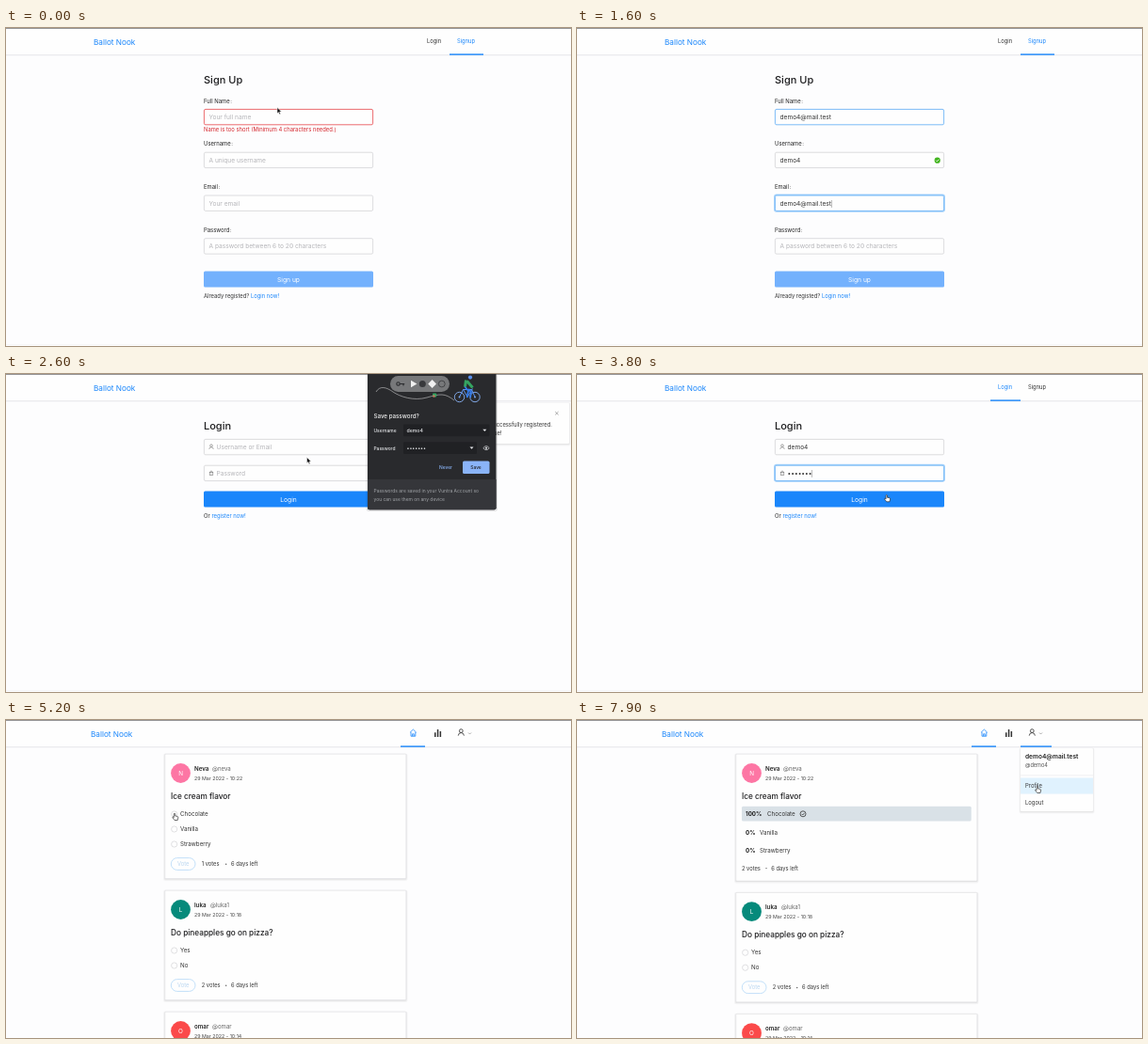
Write an HTML page that moves like this. It is 600x338 px and loops after 8 s.

```html
<!DOCTYPE html>
<html lang="en">
<head>
<meta charset="utf-8">
<title>Poll sign-up demo</title>
<style>
html, body { margin: 0; width: 100%; height: 100%; overflow: hidden; background: #fdfdfe; }
svg { display: block; width: 600px; height: 338px; font-family: Inter, "Liberation Sans", sans-serif; white-space: pre; }
</style>
</head>
<body>
<svg id="stage" viewBox="0 0 600 338"></svg>
<script>
const LOOP = 8000, BLUE = '#1a86fb', INK = '#333', GREY = '#b4b4b8';
const EMAIL = 'demo4@mail.test', USER = 'demo4', DOTS = '•••••••';
const stage = document.getElementById('stage');

const clamp = v => Math.max(0, Math.min(1, v));
const progress = (t, from, to) => clamp((t - from) / (to - from));
const ease = p => p * p * (3 - 2 * p);
const typed = (s, t, from, to) => s.slice(0, Math.floor(progress(t, from, to) * s.length + 1e-6));
const within = (t, from, to) => t >= from && t < to;

const text = (x, y, s, size = 5.9, fill = INK, extra = '') =>
  `<text x="${x}" y="${y}" font-size="${size}" fill="${fill}" ${extra}>${s}</text>`;
const rect = (x, y, w, h, fill, extra = '') =>
  `<rect x="${x}" y="${y}" width="${w}" height="${h}" fill="${fill}" ${extra}/>`;
const circle = (x, y, r, fill, extra = '') =>
  `<circle cx="${x}" cy="${y}" r="${r}" fill="${fill}" ${extra}/>`;
const line = (d, stroke, width = .7, extra = '') =>
  `<path d="${d}" fill="none" stroke="${stroke}" stroke-width="${width}" ${extra}/>`;
const shape = (d, fill, extra = '') => `<path d="${d}" fill="${fill}" ${extra}/>`;
const group = (s, x, y, opacity = 1) => `<g transform="translate(${x} ${y})" opacity="${opacity}">${s}</g>`;
const MID = 'text-anchor="middle"', MEDIUM = 'font-weight="500"', BOLD = 'font-weight="600"';

// Elevated white panel with a soft edge
const panel = (x, y, w, h) =>
  rect(x - 1.5, y - .5, w + 3, h + 3, '#000', 'opacity=".035" rx="2"') +
  rect(x - .5, y, w + 1, h + 1.2, '#000', 'opacity=".06" rx="1"') +
  rect(x, y, w, h, '#fefefe', 'rx="1"');

function header(brandX, tabs) {
  return rect(0, 0, 600, 28, '#fefefe') + rect(0, 0, 600, .9, '#8b8b8d') +
    rect(0, 28, 600, .8, '#e6e6e8') + rect(0, 28.8, 600, 1, '#f5f5f7') +
    text(brandX, 17.5, 'Ballot Nook', 8.2, BLUE) + tabs;
}

function authHeader(active) {
  const x = active ? 471 : 439;
  return header(93, text(447, 16.3, 'Login', 5.8, active ? INK : BLUE) +
    text(479, 16.3, 'Signup', 5.8, active ? BLUE : INK) + rect(x, 27.4, active ? 36 : 32, 1.4, BLUE)) +
    rect(0, 336.5, 600, .7, '#f1f1f3');
}

function field(y, o) {
  const x = o.icon ? 223.5 : 215.5;
  const edge = o.error ? '#e8474c' : o.focus || o.hover ? '#5cabf5' : '#d3d3d6';
  const caret = o.focus ? '<tspan font-weight="200" dx="-.6" fill="#000">|</tspan>' : '';
  return (o.focus ? rect(209.8, y - .3, 180.4, 17.6, 'none', 'rx="2" stroke="#a9d4fb" stroke-width="1.5"') : '') +
    rect(210.4, y + .4, 179.2, 16.4, '#fefefe', `rx="1.5" stroke="${edge}" stroke-width=".8"`) +
    (o.icon === 'user' ? userIcon(218, y + 8.4, .62, '#777') : o.icon ? lockIcon(218, y + 8.4) : '') +
    text(x, y + 11, o.value ? o.value + caret : o.hint, 6.6, o.value ? INK : GREY);
}

const button = (y, label, fill) => rect(210, y, 180, 17, fill, 'rx="1.5"') +
  text(300, y + 11.2, label, 6.7, '#fff', MID);

const userIcon = (x, y, s, color) => `<g transform="translate(${x} ${y}) scale(${s})">` +
  line('M-3.6 4 Q-3.4.6 0 .4 Q3.4.6 3.6 4', color, 1) +
  circle(0, -1.9, 2.2, 'none', `stroke="${color}" stroke-width="1"`) + '</g>';
const lockIcon = (x, y) => rect(x - 1.8, y - .6, 3.6, 2.9, 'none', 'stroke="#777" stroke-width=".6"') +
  line(`M${x - 1.2} ${y - .6}v-.8q1.2-1.8 2.4 0v.8M${x} ${y + .3}v1`, '#777', .6);

function signup(t) {
  const name = typed(EMAIL, t, 250, 650), user = typed(USER, t, 750, 1050);
  const email = typed(EMAIL, t, 1150, 1580), pass = typed(DOTS, t, 1700, 2050);
  const error = name.length < 4;
  const label = (y, s) => text(210, y, s + '\u200a:', 5.9, '#222');
  return authHeader(true) + text(210, 58.5, 'Sign Up', 11, '#1d1d1f', MEDIUM) +
    label(79.5, 'Full Name') + label(125.3, 'Username') + label(171, 'Email') + label(216.8, 'Password') +
    field(86, { value: name, hint: 'Your full name', error, hover: true, focus: within(t, 200, 700) && !error }) +
    field(131.8, { value: user, hint: 'A unique username', focus: within(t, 700, 1100) }) +
    field(177.6, { value: email, hint: 'Your email', focus: within(t, 1100, 1660) }) +
    field(223.3, { value: pass, hint: 'A password between 6 to 20 characters', focus: t >= 1660 }) +
    (error ? text(210, 110, 'Name is too short (Minimum 4 characters needed.)', 5.85, '#d5262c') : '') +
    (t > 1300 ? circle(382.7, 140.7, 3.1, '#43b51f') + line('M381.2 140.7l1.1 1.2 1.9-2.2', '#fff', .8) : '') +
    button(258.5, 'Sign up', t > 2050 ? BLUE : '#73b1fd') +
    text(210, 286.7, `Already registed? <tspan fill="${BLUE}">Login now!</tspan>`, 5.85);
}

function login(t) {
  const user = typed(USER, t, 3180, 3380), pass = typed(DOTS, t, 3420, 3680);
  return authHeader(false) + text(210, 58.5, 'Login', 11, '#1d1d1f', MEDIUM) +
    field(69, { icon: 'user', value: user, hint: 'Username or Email', focus: within(t, 3150, 3400) }) +
    field(96.8, { icon: 'lock', value: pass, hint: 'Password', focus: t >= 3400 }) +
    button(124.4, 'Login', BLUE) +
    text(210, 152.7, `Or <tspan fill="${BLUE}">register now!</tspan>`) +
    notice(t) + (within(t, 2350, 2900) ? passwordBubble() : '');
}

function notice(t) {
  const shown = ease(progress(t, 2230, 2420)) * (1 - ease(progress(t, 3400, 3560)));
  if (!shown) return '';
  return group(panel(433, 30.5, 165, 43.5) +
    circle(448, 43, 4, 'none', 'stroke="#52c41a" stroke-width=".8"') + line('M446.2 43l1.3 1.4 2.4-2.8', '#52c41a', .8) +
    text(457, 44.5, 'Ballot Nook', 6.7, '#222') +
    line('M583.2 40l3.4 3.4m0-3.4l-3.4 3.4', '#888', .7) +
    text(580, 56, "Thank you! You're successfully registered.", 5.85, INK, 'text-anchor="end"') +
    text(457, 64.6, 'Please Login to continue!', 5.85), (1 - shown) * 167, 0, shown);
}

function passwordBubble() {
  const pale = '#e8eaed', sky = '#8ab4f8', white = '#f1f1f1';
  const arrow = (x, y) => shape(`M${x - 2} ${y - 1}h4l-2 2.2z`, pale);
  const wheel = x => circle(x, 24.5, 5.2, 'none', `stroke="${sky}" stroke-width=".9"`) + circle(x, 24.5, .9, sky);
  const art = line('M393 19C397 12 404 14 411 19S433 29 447 25S466 20 476 28', '#c9cacc', .6) +
    rect(408, 2, 63, 17, '#77787a', 'rx="8.5"') +
    circle(416.5, 10.5, 1.7, 'none', 'stroke="#292a2d" stroke-width="1.1"') + line('M418.2 10.5h5m-1.2 0v2', '#292a2d', 1.1) +
    shape('M430 6.8l6.4 3.7-6.4 3.7z', white) + circle(442.3, 10.5, 3.5, '#38393c') +
    shape('M452.6 6l4.4 4.5-4.4 4.5-4.4-4.5z', white) +
    circle(462.8, 10.5, 3.4, 'none', 'stroke="#38393c" stroke-width=".8"') +
    rect(453, 20.5, 4.2, 4, '#35a461', 'rx="1"') + rect(453.4, 22.5, 2, 2, '#ea6a5d') +
    wheel(481.5) + wheel(498) +
    line('M481.5 24.5l4-8h9l3.5 8m-12.5-8l4.5 8 5.5-9', '#5a91ef', 1) +
    line('M487 13l4 5-1.5 7m1.5-9l3 3-1 6', '#347bea', 1.8) +
    line('M488.5 6.5l-1 7m2-6l6 7', '#35a461', 3) + circle(493, 3.6, 2.1, '#5a91ef');
  const label = (y, s) => text(390.5, y, s, 4.9, pale, MEDIUM);
  return rect(382.5, 0, 139.5, 146, '#000', 'opacity=".1" rx="3"') +
    rect(384, -4, 136.5, 148.3, '#292a2d', 'rx="2"') + art +
    text(390.5, 47, 'Save password?', 6.2, white, MEDIUM) +
    label(61.5, 'Username') + label(80.5, 'Password') +
    rect(422, 53.5, 91.5, 12.8, '#202124', 'rx="1"') + text(425.5, 61.7, USER, 5.2, pale, MEDIUM) + arrow(508.3, 59.7) +
    rect(422, 72.2, 78, 12.8, '#202124', 'rx="1"') + text(425.5, 80.7, DOTS, 5.2, pale) + arrow(494.5, 78.5) +
    line('M506.8 78.7q3.2-4 6.4 0q-3.2 4-6.4 0z', pale, .7) + circle(510, 78.7, 1, pale) +
    text(467, 101, 'Never', 4.9, sky, MID + MEDIUM) +
    rect(485, 92.6, 28.5, 13.5, sky, 'rx="1.6"') + text(499, 101, 'Save', 4.9, '#202124', MID + MEDIUM) +
    shape('M384 112h136.5v30.3q0 2-2 2h-132.5q-2 0-2-2z', '#35363a') +
    text(390.5, 126, 'Passwords are saved in your Vuntra Account so', 4.95, '#a2a5a9') +
    text(390.5, 134.7, 'you can use them on any device', 4.95, '#a2a5a9');
}

function homeHeader(menu) {
  return header(90, line('M429 13.3l3.4-3.2 3.4 3.2m-5.8-.3v4.2h4.8v-4.2m-3.2 4.2v-2.4h1.6v2.4', BLUE, .8) +
    rect(419, 27.4, 26, 1.4, BLUE) +
    rect(455, 13.3, 1.5, 4.7, INK) + rect(457.8, 10, 1.5, 8, INK) + rect(460.6, 12, 1.5, 6, INK) +
    userIcon(483.3, 13.2, .85, INK) + line('M491 13.5l1.5 1.5 1.5-1.5', '#777', .6) +
    (menu ? rect(471, 27.4, 33, 1.4, BLUE) : ''));
}

const meta = (x, y, votes) => text(x, y, votes + ' votes', 5.75) +
  circle(x + 26, y - 2, .7, '#555') + text(x + 31.3, y, '6 days left', 5.8);

function card(y, p) {
  const n = p.options.length, voteY = 69 + 16 * n;
  const h = p.result ? 135 : 84.5 + 16 * n;
  let s = panel(168.5, 0, 256.5, h) + rect(168.8, .2, 256, h, 'none', 'stroke="#dcdce0" stroke-width=".6" rx="1"') +
    circle(185.5, 20.5, 10.4, p.color) + text(185.5, 22.8, p.name[0].toUpperCase(), 6.3, '#fff', MID) +
    text(200, 18.2, p.name, 6.2, '#222', BOLD) + text(p.handleX, 18.2, p.handle, 6.1, '#666') +
    text(200, 28, '29 Mar 2022 - ' + p.time, 5.3, '#444') +
    text(175, 48, p.title, 8.25, '#1d1d1f', MEDIUM);
  if (p.result) {
    s += rect(175, 55.8, 243.7, 15.8, '#d9e1e7', 'rx="1.5"') +
      p.options.map((o, i) => {
        const base = 66 + 19.5 * i;
        return text(179, base, i ? '0%' : '100%', 6.2, '#222', 'font-weight="700"') +
          text(i ? 194 : 202, base, o, 6.2);
      }).join('') +
      circle(240, 63.8, 3, 'none', 'stroke="#333" stroke-width=".8"') + line('M238.6 63.8l1.1 1.2 1.9-2.2', INK, .8) +
      meta(175, 123.6, 2);
  } else {
    s += p.options.map((o, i) => {
      const cy = 64 + 16 * i, on = p.picked && !i;
      return circle(178.7, cy, 3.1, '#fff', `stroke="${on ? BLUE : '#d3d3d6'}" stroke-width=".7"`) +
        (on ? circle(178.7, cy, 1.7, BLUE) : '') + text(185, cy + 2.2, o, 6.2);
    }).join('');
    if (p.focus) s += rect(174.6, voteY - 7, 27, 14, 'none', 'rx="7" stroke="#a9d4fb" stroke-width="1.6"');
    s += rect(175.3, voteY - 6.4, 25.7, 12.8, '#fefefe', `rx="6.4" stroke="${p.picked ? BLUE : '#b4d8f8'}" stroke-width=".8"`) +
      text(188.2, voteY + 2.1, 'Vote', 5.8, p.picked ? BLUE : '#b9d6f0', MID) +
      meta(207.7, voteY + 2.3, p.votes);
  }
  return group(s, 0, y);
}

function home(t) {
  const result = t >= 6450, shift = result ? 2.2 : 0;
  const menu = ease(progress(t, 7230, 7400));
  let s = card(36, { name: 'Neva', handle: '@neva', handleX: 219, time: '10:22', color: '#fd76a4', title: 'Ice cream flavor',
      options: ['Chocolate', 'Vanilla', 'Strawberry'], votes: 1, picked: t >= 5250, focus: t >= 6050, result }) +
    card(181 + shift, { name: 'luka', handle: '@luka1', handleX: 217, time: '10:18', color: '#068a7b',
      title: 'Do pineapples go on pizza?', options: ['Yes', 'No'], votes: 2 }) +
    card(310 + shift, { name: 'omar', handle: '@omar', handleX: 219, time: '10:14', color: '#fb4a4a',
      title: '', options: ['Yes', 'No'], votes: 2 }) +
    homeHeader(t >= 7200);
  if (menu) s += group(panel(471, 30, 77, 67) +
    text(476, 41.2, EMAIL, 6.6, '#222', BOLD) + text(476, 50, '@' + USER, 5.6, '#555') +
    rect(471, 58.6, 77, .6, '#e6e6e8') +
    (t > 7560 ? rect(471, 61.5, 77, 17, '#e0f2fe') : '') +
    text(476, 72, 'Profile', 5.9) + text(476, 89.6, 'Logout', 5.9), 0, (menu - 1) * 4, menu);
  return s;
}

// Pointer stops: time, x, y
const stops = [[0, 288, 84.5], [2200, 288, 84.5], [2550, 319.5, 88.5], [2630, 319.5, 88.5], [2830, 467, 98],
  [2920, 467, 98], [3140, 319, 76], [3670, 319, 100], [3790, 328.8, 128.3], [4000, 328.8, 128.3],
  [4150, 464.5, 101], [4230, 464.5, 101], [4520, 410, 104], [5050, 179, 99], [5400, 179, 99], [5950, 186.4, 148.3],
  [6550, 186.4, 148.3], [7100, 464, 22], [7230, 483, 14], [7420, 483, 14], [7800, 488.8, 70], [LOOP, 488.8, 70]];

function pointer(t) {
  if (within(t, 280, 2200) || within(t, 3180, 3680)) return '';
  const i = stops.findIndex(s => s[0] > t), [t0, x0, y0] = stops[i - 1], [t1, x1, y1] = stops[i];
  const p = ease(progress(t, t0, t1));
  const hand = within(t, 2780, 2950) || within(t, 3740, 4040) || within(t, 5000, 5420) ||
    within(t, 5850, 6450) || t >= 7200;
  return group(hand
    ? shape('M-.7.6Q0-.5.7.6V3L3 3.4Q4 3.7 3.8 4.8L3.2 7.5H0L-2 5Q-2.4 3.7-1.4 4L-.7 4.6Z', '#fff',
      'stroke="#222" stroke-width=".65" stroke-linejoin="round"')
    : shape('M0 0V6.3L1.4 5L2.4 7.2L3.5 6.7L2.5 4.6H4.5Z', '#111', 'stroke="#fff" stroke-width=".5"'),
    x0 + (x1 - x0) * p, y0 + (y1 - y0) * p);
}

function draw() {
  const t = performance.now() % LOOP;
  const page = t < 2200 ? signup : t < 4050 ? login : home;
  stage.innerHTML = page(t) + pointer(t);
  requestAnimationFrame(draw);
}
draw();
</script>
</body>
</html>
```
